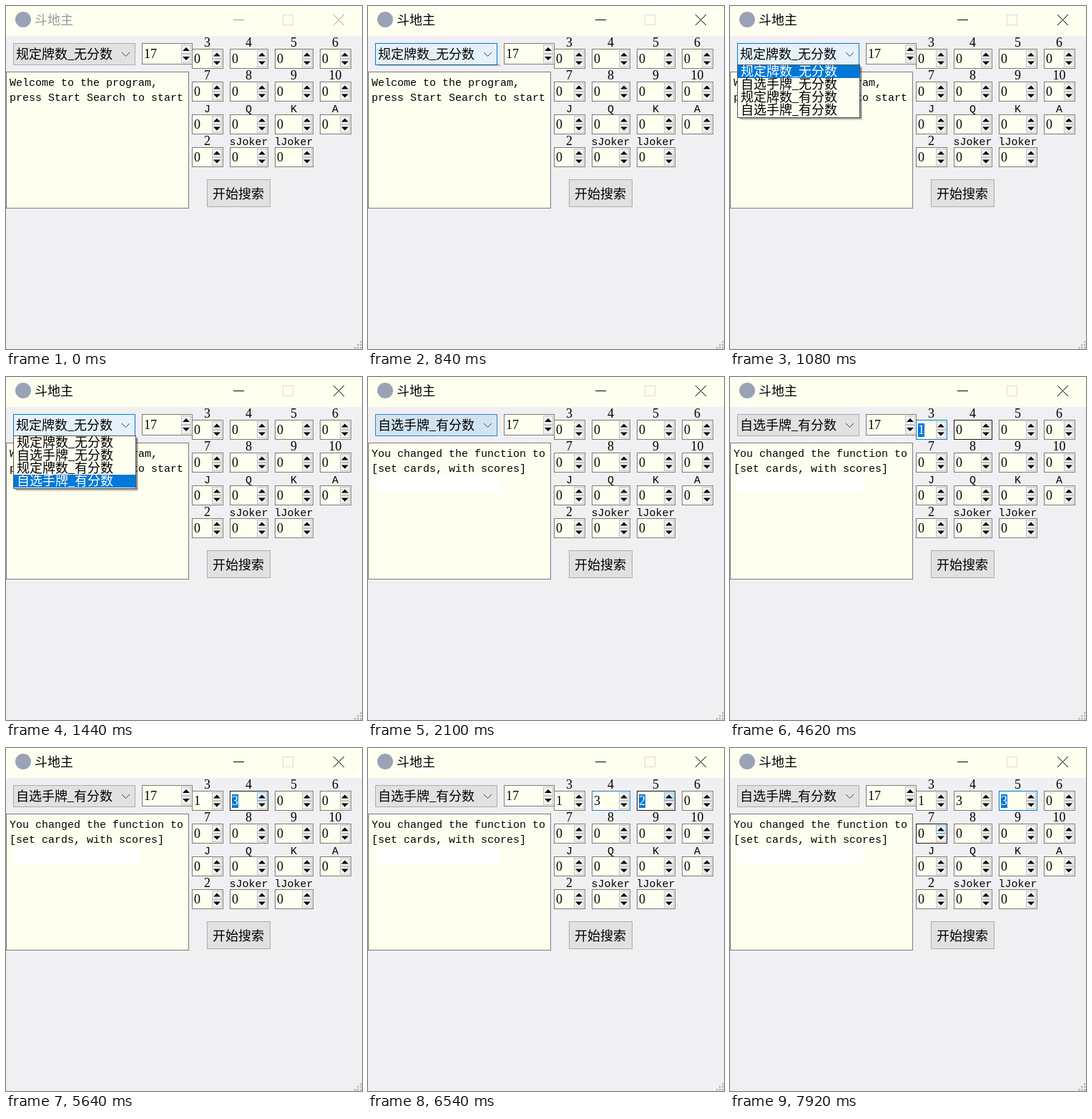
These frames come from a looping animation (498x481 px, 8 s). An HTML page:

```html
<!DOCTYPE html>
<html lang="zh-CN">
<head>
<meta charset="utf-8">
<style>
  html, body { margin: 0; width: 100%; height: 100%; overflow: hidden; background: #f0f0f2; }
  svg { display: block; }
  text { white-space: pre; }
  .song { font: 300 18px "Liberation Serif", "Noto Sans CJK SC", "Noto Sans CJK", serif; }
  .ui { font: 18px "Noto Sans CJK SC", "Noto Sans CJK", sans-serif; }
  .mono { font: 15px "Liberation Mono", monospace; }
  .mid { text-anchor: middle; }
</style>
</head>
<body>
<svg id="stage" width="498" height="481" viewBox="0 0 498 481"></svg>
<script>
const LOOP = 8000;
const GRAY = '#7a7a7a', DARK = '#171717', BLUE = '#0078d7';
const FACE = '#f0f0f0', LIT = '#e5f1fb', PRESSED = '#cce4f7';
const IVORY = '#fffff0', EDGE = '#adadad', BUTTON = '#e1e1e1';
const stage = document.getElementById('stage');

function add(parent, tag, attrs, text) {
  const node = document.createElementNS('http://www.w3.org/2000/svg', tag);
  for (const k in attrs) node.setAttribute(k, attrs[k]);
  if (text) node.textContent = text;
  parent.append(node);
  return node;
}
const box = (p, x, y, w, h, fill, stroke) =>
  add(p, 'rect', { x: x + .5, y: y + .5, width: w - 1, height: h - 1, fill, stroke });
const fillBox = (p, x, y, width, height, fill) =>
  add(p, 'rect', { x, y, width, height, fill });
const line = (p, d, stroke) => add(p, 'path', { d, stroke, fill: 'none' });
const label = (p, x, y, text, cls = 'song', fill = '#000') =>
  add(p, 'text', { x, y, class: cls, fill }, text);

// keys: [time, value, fade length]; a missing fade is a hard change
function play(node, prop, keys) {
  let last = keys[0][1];
  const frames = [{ offset: 0, [prop]: last }];
  for (const [t, value, fade = 0] of keys.slice(1)) {
    frames.push({ offset: t / LOOP, [prop]: last }, { offset: (t + fade) / LOOP, [prop]: value });
    last = value;
  }
  frames.push({ offset: 1, [prop]: last });
  node.animate(frames, { duration: LOOP, iterations: Infinity });
}
function show(node, from, to = LOOP) {
  const keys = [[0, from > 0 ? 0 : 1]];
  if (from > 0) keys.push([from, 1]);
  if (to < LOOP) keys.push([to, 0]);
  play(node, 'opacity', keys);
}

function spinner(x, y, w, h, value, act = {}) {
  const frame = box(stage, x, y, w, h, IVORY, GRAY);
  const bx = x + w - 16, half = (h - 4) / 2, cx = bx + 7;
  const up = box(stage, bx, y + 2, 14, half, FACE, '#c4c4c4');
  box(stage, bx, y + 2 + half, 14, half, FACE, '#c4c4c4');
  const uy = y + half / 2 + 4.5, dy = uy + half - 5;
  add(stage, 'path', { d: `M${cx - 5} ${uy}h10l-5-5zM${cx - 5} ${dy}h10l-5 5z` });

  const base = y + h / 2 + 6;
  const values = act.values || [[0, value]];
  values.forEach(([t, v, selected], i) => {
    const g = add(stage, 'g', {});
    if (selected) fillBox(g, x + 3, base - 15, 9, 19, BLUE);
    label(g, x + 3, base, v, 'song', selected ? '#fff' : '#000');
    if (values.length > 1) show(g, t, values[i + 1] ? values[i + 1][0] : LOOP);
  });
  if (act.border) play(frame, 'stroke', [[0, act.start || GRAY], ...act.border]);
  if (act.up) {
    const edges = act.up.map(([t, c, f]) => [t, c === FACE ? '#c4c4c4' : '#7eb4ea', f]);
    play(up, 'fill', [[0, FACE], ...act.up]);
    play(up, 'stroke', [[0, '#c4c4c4'], ...edges]);
  }
}

function titleBar() {
  fillBox(stage, 0, 0, 498, 42, IVORY);
  add(stage, 'circle', { cx: 24, cy: 19, r: 11, fill: '#9aa3b5' });
  const name = label(stage, 40, 26, '斗地主', 'ui');
  const signs = line(stage, 'M318 19.5h15M458 12l15 15M473 12l-15 15', '#000');
  box(stage, 387, 12, 15, 15, 'none', '#dcdcd2');
  play(name, 'fill', [[0, '#999'], [780, '#000']]);
  play(signs, 'stroke', [[0, '#999'], [780, '#000']]);
}

const MODES = ['规定牌数_无分数', '自选手牌_无分数', '规定牌数_有分数', '自选手牌_有分数'];

function combo() {
  const face = box(stage, 10, 52, 171, 31, BUTTON, EDGE);
  play(face, 'fill', [[0, BUTTON], [660, LIT, 180], [1920, PRESSED], [1980, BUTTON, 480]]);
  play(face, 'stroke', [[0, EDGE], [660, BLUE, 180], [1980, EDGE, 480]]);
  show(label(stage, 14, 74, MODES[0]), 0, 1920);
  show(label(stage, 14, 74, MODES[3]), 1920);
  line(stage, 'M162 65l5.5 5.5 5.5-5.5', '#444');
}

function dropList() {
  const clip = add(add(stage, 'defs', {}), 'clipPath', { id: 'below' });
  fillBox(clip, 0, 82, 200, 90);
  const list = add(add(stage, 'g', { 'clip-path': 'url(#below)' }), 'g', {});
  fillBox(list, 14, 86, 171, 74, 'rgba(0,0,0,.18)');
  fillBox(list, 13, 85, 171, 73, 'rgba(0,0,0,.3)');
  box(list, 10, 82, 172, 75, IVORY, '#555');
  const moves = [0, 1260, 1320, 1440, LOOP];
  MODES.forEach((mode, i) => {
    const y = 83 + i * 18;
    label(list, 15, y + 15, mode);
    const on = add(list, 'g', {});
    fillBox(on, 11, y, 170, 18, BLUE);
    label(on, 15, y + 15, mode, 'song', '#fff');
    show(on, moves[i], moves[i + 1]);
  });
  show(list, 840, 1920);
  play(list, 'transform', [[0, 'translateY(-76px)'], [840, 'translateY(0px)', 180]]);
}

function message(lines, from, to, ghost) {
  const g = add(stage, 'g', {});
  if (ghost) {
    fillBox(g, 10, 138, 176, 23, '#fff');
    label(g, 221, 133, 'art', 'mono', '#fff');
  }
  lines.forEach((s, i) => label(g, 5, 112 + i * 21, s, 'mono'));
  show(g, from, to);
}

const actions = {
  '3': {
    border: [[2760, DARK, 240], [4200, BLUE, 300], [4920, GRAY, 240]],
    up: [[2940, LIT, 180], [3600, PRESSED], [3840, LIT], [4080, FACE, 240]],
    values: [[0, '0'], [3600, '1', true], [4920, '1']]
  },
  '4': {
    border: [[4260, DARK, 120], [5880, BLUE, 180], [6360, GRAY, 480]],
    up: [[4680, LIT, 120], [4920, PRESSED], [5040, LIT], [5220, PRESSED], [5340, LIT],
         [5460, PRESSED], [5640, LIT], [5820, FACE, 180]],
    values: [[0, '0'], [4920, '1', true], [5220, '2', true], [5460, '3', true], [6240, '3']]
  },
  '5': {
    start: '#6f6f6f',
    border: [[360, GRAY], [4380, DARK, 60], [4500, GRAY, 60], [5940, DARK, 180], [7500, BLUE, 180]],
    up: [[6060, LIT, 120], [6240, PRESSED], [7140, LIT], [7440, FACE, 240]],
    values: [[0, '0'], [6240, '1', true], [6480, '2', true], [7020, '3', true]]
  },
  '7': {
    border: [[2460, DARK], [2700, GRAY, 240], [7860, DARK]],
    up: [[7860, LIT]]
  },
  '8': { border: [[7620, DARK, 60], [7740, GRAY]] },
  '9': { border: [[7500, DARK, 60], [7620, GRAY, 60]] }
};

titleBar();
combo();
spinner(190, 52, 71, 30, '17');
box(stage, 0, 92, 256, 192, IVORY, GRAY);
message(['Welcome to the program,', 'press Start Search to start'], 0, 1980);
message(['You changed the function to', '[set cards, with scores]'], 1980, LOOP, true);

const columns = [[260, 44], [313, 54], [376, 54], [439, 44]];
'3 4 5 6 7 8 9 10 J Q K A 2 sJoker lJoker'.split(' ').forEach((card, i) => {
  const [x, w] = columns[i % 4], y = 60 + 46 * Math.floor(i / 4);
  label(stage, x + w / 2 - .5, y - 3, card, (/\d/.test(card) ? 'song' : 'mono') + ' mid');
  spinner(x, y, w, 28, '0', actions[card]);
});

box(stage, 281, 243, 89, 39, BUTTON, EDGE);
label(stage, 289, 269.5, '开始搜索');
for (let r = 0; r < 3; r++)
  for (let c = 2 - r; c < 3; c++) fillBox(stage, 487 + c * 4, 470 + r * 4, 2.5, 2.5, '#b8b8b8');
dropList();
</script>
</body>
</html>
```
